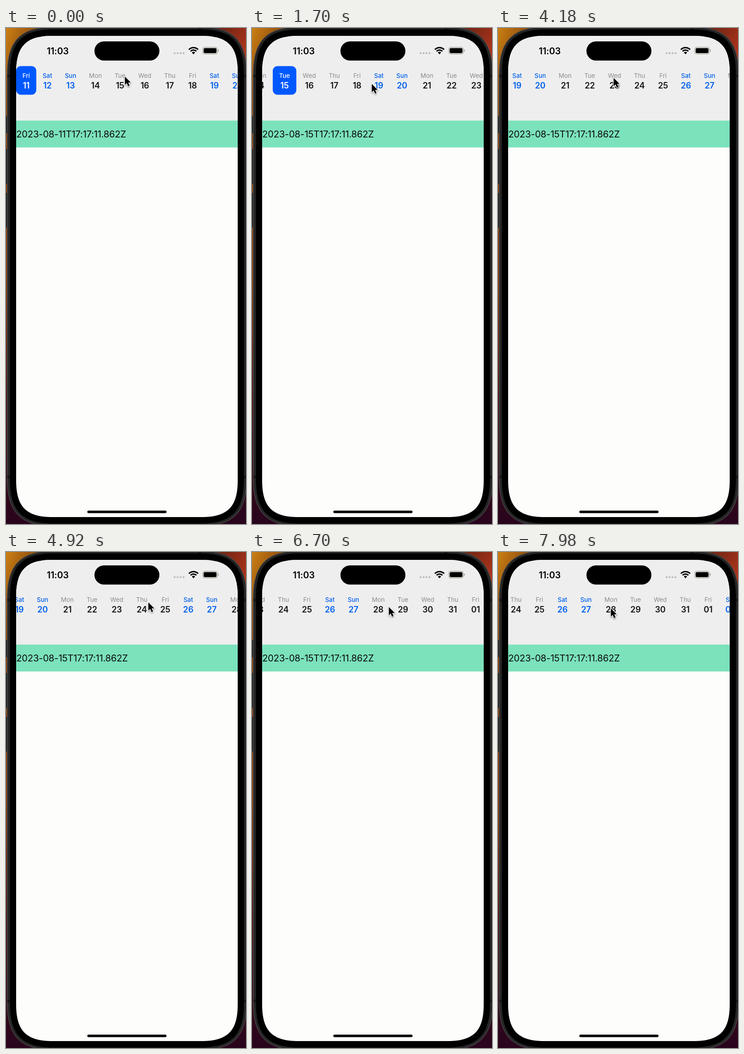
Write an HTML page with a canvas that moves like this. It is 521 px wide and 1074 px high and loops after 8 s.

```html
<!DOCTYPE html>
<html lang="en">
<head>
<meta charset="utf-8">
<title>Day strip</title>
<style>
  html, body { margin: 0; width: 100%; height: 100%; overflow: hidden; background: #000; }
  canvas { display: block; width: 521px; height: 1074px; }
</style>
</head>
<body>
<canvas id="stage"></canvas>
<script>
const W = 521, H = 1074, LOOP = 8000;
const canvas = document.getElementById('stage');
const ratio = window.devicePixelRatio || 1;
canvas.width = W * ratio;
canvas.height = H * ratio;
const ctx = canvas.getContext('2d');
const FAMILY = 'Inter, Roboto, sans-serif';
const BLUE = '#0060ee';
const names = ['Fri', 'Sat', 'Sun', 'Mon', 'Tue', 'Wed', 'Thu'];
const FIRST = 11, COUNT = 24, WEEK = 362.5;
const TUE = 4, SUN = 9, PRESS = 100, PICK = 250;

// Every flick drags for DRAG_TIME, then coasts on; the pointer lets go at x, y
const DRAG = 29, DRAG_TIME = 110, COAST = 250;
const REST = 800, GLIDE = 500, REACH = 53;
const flicks = [
  { end: 946, to: 184.5, x: 260, y: 121 },
  { end: 3487, to: 424, x: 251, y: 108 },
  { end: 5285, to: 650.5, x: 256, y: 112 },
  { end: 7983, to: 690, x: 244, y: 122 }
];

const clamp = v => Math.max(0, Math.min(1, v));
const mix = (a, b, p) => a + (b - a) * p;
const smooth = p => p * p * (3 - 2 * p);

function scrollAt(t) {
  let x = 0, from = 0;
  for (const f of flicks) {
    const start = f.end - DRAG_TIME;
    if (t < start) break;
    x = t < f.end
      ? from + DRAG * (t - start) / DRAG_TIME
      : mix(f.to, from + DRAG, Math.exp((f.end - t) / COAST));
    from = f.to;
  }
  return x;
}

// Rest after a flick, glide right to the next grab point, then drag left
function pointerAt(t) {
  let last = { end: -500, x: 258, y: 105 };
  for (const f of flicks) {
    if (t < f.end) {
      const go = smooth(clamp((t - last.end - REST) / GLIDE));
      const pull = clamp((t - f.end + DRAG_TIME) / DRAG_TIME);
      return [
        mix(last.x, f.x + REACH, go) - REACH * pull,
        mix(last.y, f.y - 3, go) + 3 * pull
      ];
    }
    last = f;
  }
  return [last.x, last.y];
}

function pressFade(t, down, up) {
  return 1 - 0.76 * clamp((t - down) / 150) * (1 - smooth(clamp((t - up) / 250)));
}

function setFont(size, weight, spacing) {
  ctx.font = `${weight} ${size}px ${FAMILY}`;
  ctx.letterSpacing = spacing + 'px';
}

function text(str, x, y, size, weight, fill, align = 'center', spacing = 0) {
  setFont(size, weight, spacing);
  ctx.textAlign = align;
  ctx.fillStyle = fill;
  ctx.fillText(str, x, y);
}

function textWidth(str, size, weight, spacing = 0) {
  setFont(size, weight, spacing);
  return ctx.measureText(str).width;
}

// A cell is as wide as its wider line plus an even padding
function layDays() {
  const days = Array.from({ length: COUNT }, (_, i) => {
    const name = names[i % 7];
    const date = String((FIRST + i - 1) % 31 + 1).padStart(2, '0');
    const inner = Math.max(textWidth(name, 13.4, 400), textWidth(date, 18, 600, -0.2));
    return { name, date, inner, weekend: name[0] === 'S' };
  });
  const pad = (WEEK - days.slice(7, 14).reduce((sum, d) => sum + d.inner, 0)) / 7;
  let left = 22;
  for (const d of days) {
    d.left = left;
    d.width = d.inner + pad;
    left += d.width;
  }
  return days;
}

function box(x, y, w, h, r, fill) {
  ctx.beginPath();
  ctx.roundRect(x, y, w, h, r);
  ctx.fillStyle = fill;
  ctx.fill();
}

function rect(x, y, w, h, fill) {
  ctx.fillStyle = fill;
  ctx.fillRect(x, y, w, h);
}

// Rectangle with corners that ease into the straight edges
function softPath(x, y, w, h, r) {
  const a = r * 1.28, c = r * 0.355, R = x + w, B = y + h;
  ctx.beginPath();
  ctx.moveTo(x + a, y);
  ctx.lineTo(R - a, y);
  ctx.bezierCurveTo(R - c, y, R, y + c, R, y + a);
  ctx.lineTo(R, B - a);
  ctx.bezierCurveTo(R, B - c, R - c, B, R - a, B);
  ctx.lineTo(x + a, B);
  ctx.bezierCurveTo(x + c, B, x, B - c, x, B - a);
  ctx.lineTo(x, y + a);
  ctx.bezierCurveTo(x, y + c, x + c, y, x + a, y);
  ctx.closePath();
}

function softBox(x, y, w, h, r, fill) {
  softPath(x, y, w, h, r);
  ctx.fillStyle = fill;
  ctx.fill();
}

function gradient(x0, y0, x1, y1, ...colors) {
  const g = ctx.createLinearGradient(x0, y0, x1, y1);
  colors.forEach((c, i) => g.addColorStop(i / (colors.length - 1), c));
  return g;
}

function drawPhone() {
  rect(0, 0, W, H, gradient(0, 0, 0, H, '#b06a12', '#8c4010', '#94400e', '#4c1414', '#28041c'));
  rect(0, 0, 100, 100, gradient(0, 0, 76, 30, '#cc8014', '#7c3e0c'));
  rect(420, 0, 101, 100, gradient(440, 0, 521, 50, '#5c2010', '#ac341c'));
  for (const [y, h] of [[191, 37], [262, 76], [357, 75]]) rect(0, y, 3, h, '#1c201e');
  softBox(2, -3, 521, 1082, 82, '#4a4a4a');
  softBox(3.5, -1.5, 518, 1079, 80, '#252525');
  for (const y of [101, 969]) {
    rect(3, y, 6, 6, '#171717');
    rect(516, y, 5, 6, '#171717');
  }
  rect(418, 0, 6, 3, '#171717');
  softBox(8.5, 3, 508, 1070, 75, '#000');
}

function wifiArc(r) {
  ctx.beginPath();
  ctx.arc(407, 56.5, r, -Math.PI * 0.755, -Math.PI * 0.245);
}

function drawStatus() {
  text('11:03', 112.3, 56.5, 19.5, 600, '#000', 'center', -0.1);
  box(192, 29, 141, 41.5, 21, '#000');
  for (let i = 0; i < 4; i++) box(363.9 + i * 6.5, 52.4, 4.2, 4.2, 2.1, '#b9b9bd');

  ctx.strokeStyle = ctx.fillStyle = '#000';
  ctx.lineWidth = 3;
  for (const r of [14, 8.8]) {
    wifiArc(r);
    ctx.stroke();
  }
  wifiArc(5);
  ctx.lineTo(407, 57);
  ctx.fill();

  ctx.beginPath();
  ctx.roundRect(427, 41.5, 32, 15, 4.8);
  ctx.strokeStyle = '#9b9d8e';
  ctx.lineWidth = 1.2;
  ctx.stroke();
  box(429, 43.5, 28, 11, 3, '#000');
  box(460, 46.5, 1.7, 5, [0, 2, 2, 0], '#9b9d8e');
}

function drawDays(t) {
  const shift = scrollAt(t);
  const picked = t < PICK ? 0 : TUE;
  const grab = flicks[1].end;
  days.forEach((d, i) => {
    const left = d.left - shift, x = left + d.width / 2;
    const on = i === picked;
    ctx.globalAlpha = i === TUE ? pressFade(t, PRESS, PICK)
      : i === SUN ? pressFade(t, grab - 260, grab) : 1;
    if (on) box(left, 82.5, d.width, 62, 10, '#0058ff');
    const accent = on ? '#fff' : d.weekend && BLUE;
    text(d.name, x, 107.7, 13.4, accent ? 500 : 400, accent || '#8b8b8b');
    text(d.date, x, 131.3, 18, 600, accent || '#151515', 'center', -0.2);
    ctx.globalAlpha = 1;
  });
}

function drawScreen(t) {
  ctx.save();
  softPath(22, 17, 481, 1042, 62);
  ctx.clip();
  rect(22, 17, 481, 1042, '#fdfdfc');
  rect(22, 17, 481, 184, '#eeeeee');
  rect(22, 200.5, 481, 58.2, '#7be2bc');
  drawStatus();
  drawDays(t);
  const date = days[t < PICK ? 0 : TUE].date;
  text(`2023-08-${date}T17:17:11.862Z`, 22.3, 237, 20.1, 400, '#0a0a0a', 'left', -0.2);
  box(176.5, 1045, 172, 5.5, 2.75, '#000');
  ctx.restore();
}

function drawPointer(t) {
  ctx.save();
  ctx.translate(...pointerAt(t));
  ctx.beginPath();
  [[0, 0], [0, 18], [4.1, 14.2], [7.1, 21.2], [10.3, 19.8], [7.4, 13], [13, 13]]
    .forEach(([x, y]) => ctx.lineTo(x, y));
  ctx.closePath();
  ctx.lineJoin = 'round';
  ctx.lineWidth = 2.4;
  ctx.strokeStyle = '#fff';
  ctx.shadowColor = 'rgba(0,0,0,.4)';
  ctx.shadowBlur = 3 * ratio;
  ctx.shadowOffsetY = 1.5 * ratio;
  ctx.stroke();
  ctx.shadowColor = 'transparent';
  ctx.fillStyle = '#000';
  ctx.fill();
  ctx.restore();
}

const days = layDays();
const begin = performance.now();

function tick() {
  const t = (performance.now() - begin) % LOOP;
  ctx.setTransform(ratio, 0, 0, ratio, 0, 0);
  drawPhone();
  drawScreen(t);
  drawPointer(t);
  requestAnimationFrame(tick);
}
tick();
</script>
</body>
</html>
```
